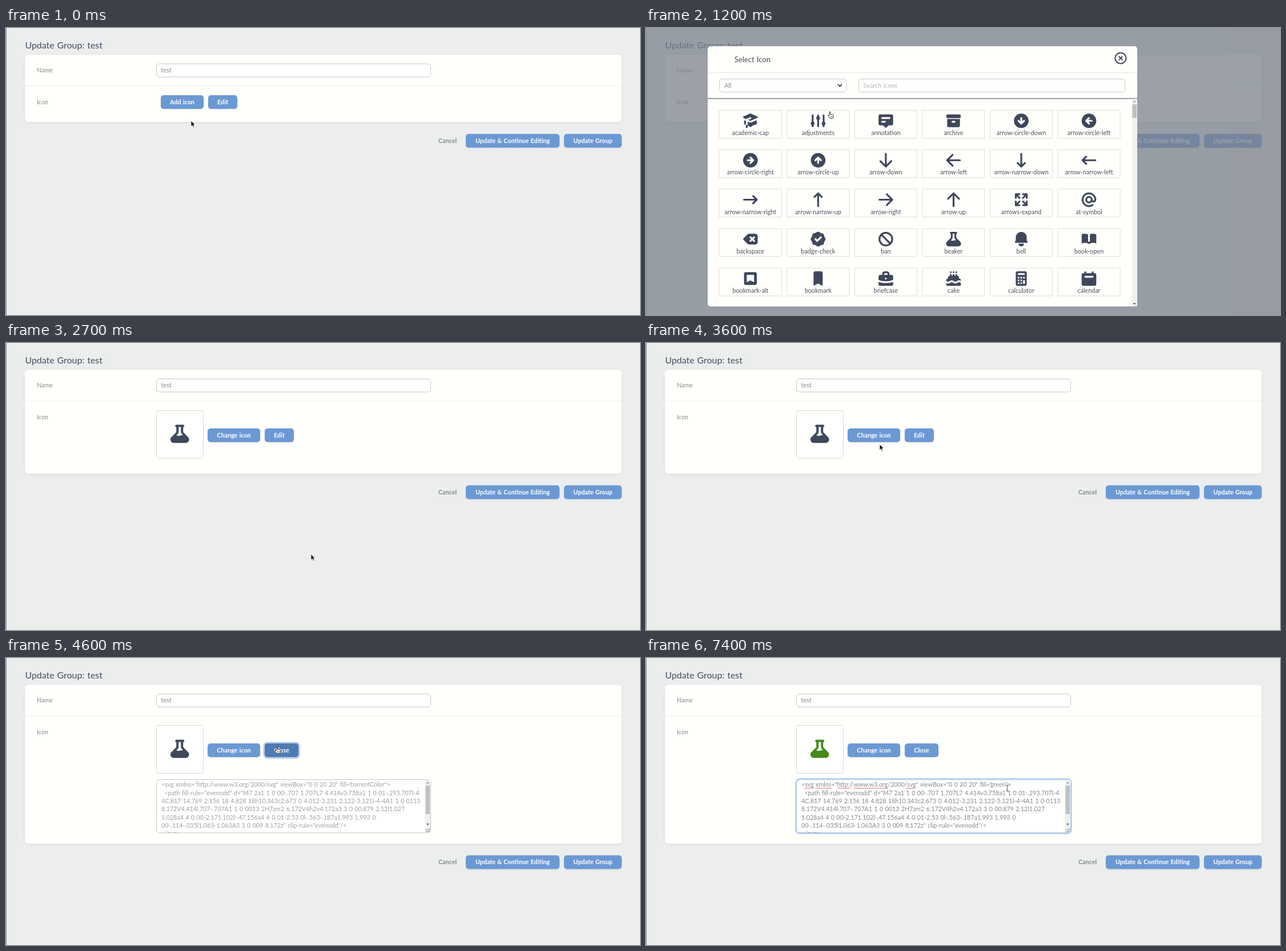
An HTML page that plays this animation: 1110x504 px, repeating every 8 s.

```html
<!DOCTYPE html>
<html lang="en">
<head>
<meta charset="utf-8">
<title>Icon field</title>
<style>
  html, body { margin: 0; width: 100%; height: 100%; overflow: hidden; background: #eceeee; }
  #stage { display: block; width: 100vw; height: 100vh; }
  text { font: 10.75px Lato, sans-serif; word-spacing: .06em; fill: #868a8f; }
  .title { font-size: 15.9px; fill: #454d5c; }
  .head { font-size: 13.1px; fill: #454d5c; }
  .bold { font-weight: 700; text-anchor: middle; }
  .btn { filter: drop-shadow(0 1px 1px rgba(0, 0, 0, .12)); }
  .btn rect { fill: #6b99d4; }
  .btn .hover { fill: #4f7bb4; }
  .btn .ring { fill: #b5cfee; }
  .btn text { fill: #fff; }
  .field { fill: #fffffe; stroke: #c4c9cc; }
  .focus { fill: none; stroke: #b5cdec; stroke-width: 3; }
  .hint { fill: #b3b6ba; }
  .cell rect { fill: none; stroke: #dde0dc; }
  .cell text { fill: #4a5160; text-anchor: middle; }
  .ink { fill: #3f475a; }
  .line { fill: none; stroke: #3f475a; stroke-width: 2; stroke-linecap: round; stroke-linejoin: round; }
  .cut { stroke: #fffffc; }
  .code text { font-size: 10.7px; }
  .panel { fill: #fffffc; }
  #card { filter: drop-shadow(0 1px 2px rgba(0, 0, 0, .07)); }

  #card, #actions, #pick, #typed, #cursor { animation: 8s step-end infinite; }
  #card { animation-name: grow; }
  #actions { animation-name: shift; }
  #pick { animation-name: tint; }
  #typed { animation-name: type; }
  #cursor { animation-name: move; }
  #code { animation: fade 8s step-end infinite; }

  @keyframes grow { 0% { height: 118px } 33.75% { height: 182.5px } 53.75%, 100% { height: 279px } }
  @keyframes shift {
    0% { transform: none }
    33.75% { transform: translateY(64px) }
    53.75%, 100% { transform: translateY(160.5px) }
  }
  @keyframes tint { 0% { fill: #3f475a } 85% { fill: #000 } 92.5%, 100% { fill: #458b1a } }
  @keyframes fade {
    0% { opacity: 0 }
    53.75% { opacity: .2; animation-timing-function: steps(4) }
    58.75%, 100% { opacity: 1 }
  }
  @keyframes type {
    0% { transform: none }
    85% { transform: translateY(-20px) }
    87.5% { transform: translateY(-40px) }
    88.75% { transform: translateY(-60px) }
    90% { transform: translateY(-80px) }
    92.5%, 100% { transform: translateY(-100px) }
  }
  @keyframes move {
    0% { transform: translate(324px, 163px) }
    2.5% { transform: translate(324px, 163px); animation-timing-function: steps(4) }
    7.5% { transform: translate(322px, 141px); animation-timing-function: steps(2) }
    10% { transform: translate(321px, 135px) }
    12.5% { transform: translate(320px, 134px) }
    15% { transform: translate(321px, 147px); animation-timing-function: steps(8) }
    25% { transform: translate(562px, 331px); animation-timing-function: steps(3) }
    28.75% { transform: translate(540px, 390px); animation-timing-function: steps(2) }
    31.25% { transform: translate(534px, 371px) }
    37.5% { transform: translate(534px, 372px); animation-timing-function: steps(6) }
    45% { transform: translate(409px, 178px) }
    46.25% { transform: translate(409px, 178px); animation-timing-function: steps(4) }
    51.25% { transform: translate(473px, 156px) }
    58.75% { transform: translate(455px, 180px) }
    60% { transform: translate(455px, 180px); animation-timing-function: steps(2) }
    62.5% { transform: translate(410px, 217px); animation-timing-function: steps(7) }
    71.25% { transform: translate(631.5px, 228.5px) }
    80%, 100% { transform: translate(632.5px, 228.5px) }
  }
</style>
</head>
<body>
<svg id="stage" viewBox="0 0 1110 504" preserveAspectRatio="none"></svg>
<script>
const LOOP = 8000;

// Windows in ms during which an element is visible.
const shown = {
  add: [[0, 2700]], addHover: [[600, 1200]], addRing: [[800, 1200]],
  modal: [[1200, 2700]],
  chosen: [[2700, LOOP]], changeHover: [[3800, 4000]],
  edit: [[2700, 4300]], editHover: [[4000, 4300]],
  close: [[4300, LOOP]], closeHover: [[4300, 4700]], closeRing: [[4300, 5800]],
  area: [[4300, LOOP]], areaFocus: [[5800, LOOP]],
  spell: [[5900, LOOP]], selection: [[5900, 6800]],
  arrow: [[0, 600], [2700, 3800], [4700, 5000]],
  hand: [[600, 2700], [3800, 4700]],
  beam: [[5000, LOOP]]
};

const windowCss = ([id, spans]) => {
  const key = (ms, o) => `${ms / LOOP * 100}% { opacity: ${o} }`;
  const keys = spans.map(([a, b]) => key(a, 1) + key(b, b < LOOP ? 0 : 1)).join('');
  return `@keyframes ${id} { 0% { opacity: 0 } ${keys} }
    #${id} { opacity: 0; animation: ${id} ${LOOP}ms step-end infinite }`;
};
const sheet = document.createElement('style');
sheet.textContent = Object.entries(shown).map(windowCss).join('\n');
document.head.append(sheet);

const esc = s => s.replace(/&/g, '&amp;').replace(/</g, '&lt;');
const text = (x, y, s, cls = '') => `<text x="${x}" y="${y}" class="${cls}">${esc(s)}</text>`;
const rect = (x, y, w, h, rx = 0, attrs = '') =>
  `<rect x="${x}" y="${y}" width="${w}" height="${h}" rx="${rx}" ${attrs}/>`;
const path = (d, attrs) => `<path d="${d}" ${attrs}/>`;

const button = (x, y, w, label, id = '') => `<g class="btn">
  ${id && rect(x - 2.5, y - 2.5, w + 5, 29, 7, `id="${id}Ring" class="ring" opacity="0"`)}
  ${rect(x, y, w, 24, 5)}
  ${id && rect(x, y, w, 24, 5, `id="${id}Hover" class="hover" opacity="0"`)}
  ${text(x + w / 2, y + 15.6, label, 'bold')}</g>`;

const beaker = 'M7 2a1 1 0 00-.707 1.707L7 4.414v3.758a1 1 0 01-.293.707l-4 4C.817 14.769 2.156 18 4.828 18h10.343c2.673 0 4.012-3.231 2.122-5.121l-4-4A1 1 0 0113 8.172V4.414l.707-.707A1 1 0 0013 2H7zm2 6.172V4h2v4.172a3 3 0 00.879 2.12l1.027 1.028a4 4 0 00-2.171.102l-.47.156a4 4 0 01-2.53 0l-.563-.187a1.993 1.993 0 00-.114-.035l1.063-1.063A3 3 0 009 8.172z';

// Icon parts on a 20 unit grid.
const fill = d => path(d, 'class="ink" fill-rule="evenodd"');
const line = d => path(d, 'class="line"');
const cut = d => path(d, 'class="line cut"');
const turn = (deg, s) => `<g transform="rotate(${deg} 10 10)">${s}</g>`;
const disc = '<circle cx="10" cy="10" r="8" class="ink"/>';
const ring = r => `<circle cx="10" cy="10" r="${r}" class="line"/>`;
const round = deg => turn(deg, disc + cut('M10 7v5.5M7 10l3 3 3-3'));
const wide = deg => turn(deg, line('M10 3v13M4 11l6 6 6-6'));
const narrow = deg => turn(deg, line('M10 3v13M6 13l4 4 4-4'));

const icons = {
  'academic-cap': fill('M10.4 2.08a1 1 0 00-.8 0l-7 3a1 1 0 000 1.84L5.25 8.05a1 1 0 01.36-.26l4-1.71a1 1 0 11.79 1.84L7.67 9.09l1.94.83a1 1 0 00.79 0l7-3a1 1 0 000-1.84z')
    + fill('M3.3 9.4L5 10.12v4.1a9 9 0 00-1.05-.17 1 1 0 01-.9-.9 11 11 0 01.25-3.75zM9.3 16.57A9 9 0 007 14.93v-3.95l1.82.78a3 3 0 002.36 0l5.5-2.36a11 11 0 01.26 3.76 1 1 0 01-.9.89 9 9 0 00-5.34 2.52 1 1 0 01-1.4 0zM6 18a1 1 0 001-1v-2.07a9 9 0 00-2-.7V17a1 1 0 001 1z'),
  'adjustments': line('M4 4v12M10 4v12M16 4v12')
    + [[4, 13], [10, 7], [16, 13]].map(([x, y]) => `<circle cx="${x}" cy="${y}" r="2" class="ink"/>`).join(''),
  'annotation': fill('M18 13V5a2 2 0 00-2-2H4a2 2 0 00-2 2v8a2 2 0 002 2h3l3 3 3-3h3a2 2 0 002-2z') + cut('M6 7h8M6 11h3'),
  'archive': fill('M4 3a2 2 0 100 4h12a2 2 0 100-4H4zM3 8h14v7a2 2 0 01-2 2H5a2 2 0 01-2-2z') + cut('M9 11h2'),
  'arrow-circle-down': round(0),
  'arrow-circle-left': round(90),
  'arrow-circle-right': round(270),
  'arrow-circle-up': round(180),
  'arrow-down': wide(0),
  'arrow-left': wide(90),
  'arrow-narrow-down': narrow(0),
  'arrow-narrow-left': narrow(90),
  'arrow-narrow-right': narrow(270),
  'arrow-narrow-up': narrow(180),
  'arrow-right': wide(270),
  'arrow-up': wide(180),
  'arrows-expand': [0, 90, 180, 270].map(a => turn(a, line('M8 4H4v4M4 4l4 4'))).join(''),
  'at-symbol': ring(3) + line('M13 10a2 2 0 004 0A7 7 0 1013.8 15.9'),
  'backspace': fill('M6.7 4.88A3 3 0 018.83 4H15a3 3 0 013 3v6a3 3 0 01-3 3H8.83a3 3 0 01-2.12-.88L2.3 10.7a1 1 0 010-1.4z') + cut('M10 8l4 4M14 8l-4 4'),
  'badge-check': [0, 90, 180, 270].map(a => turn(a,
    fill('M10 10L3.45 6.27a3.07 3.07 0 012.82-2.82 3.07 3.07 0 001.74-.72 3.07 3.07 0 013.98 0 3.07 3.07 0 001.74.72z'))).join('')
    + cut('M7 10l2 2 4-4'),
  'ban': ring(7) + line('M5.2 5.2l9.6 9.6'),
  'beaker': fill(beaker),
  'bell': fill('M10 2a6 6 0 00-6 6v3.59l-.7.7A1 1 0 004 14h12a1 1 0 00.7-1.7l-.7-.71V8a6 6 0 00-6-6zM10 18a3 3 0 01-3-3h6a3 3 0 01-3 3z'),
  'book-open': fill('M9 4.8A8 8 0 005.5 4c-1.25 0-2.44.3-3.5.8v10a8 8 0 013.5-.8c1.67 0 3.22.5 4.5 1.4a8 8 0 014.5-1.4c1.25 0 2.44.3 3.5.8v-10a8 8 0 00-3.5-.8c-1.25 0-2.44.3-3.5.8V12a1 1 0 11-2 0z'),
  'bookmark-alt': fill('M3 5a2 2 0 012-2h10a2 2 0 012 2v10a2 2 0 01-2 2H5a2 2 0 01-2-2zM14 6H6v8l4-2 4 2z'),
  'bookmark': fill('M5 4a2 2 0 012-2h6a2 2 0 012 2v14l-5-2.5L5 18z'),
  'briefcase': fill('M6 6V5a3 3 0 013-3h2a3 3 0 013 3v1h2a2 2 0 012 2v3.57A23 23 0 0110 13a23 23 0 01-8-1.43V8a2 2 0 012-2zM8 5a1 1 0 011-1h2a1 1 0 011 1v1H8z')
    + fill('M2 13.7V16a2 2 0 002 2h12a2 2 0 002-2v-2.3A25 25 0 0110 15a25 25 0 01-8-1.3z') + cut('M10 10h.01'),
  'cake': fill('M4 10V9a2 2 0 012-2h8a2 2 0 012 2v1a2 2 0 012 2v5a1 1 0 01-1 1H3a1 1 0 01-1-1v-5a2 2 0 012-2z')
    + line('M7 6v2M10 6v2M13 6v2M7 3h.01M10 3h.01M13 3h.01') + cut('M2 13.7q2 1.6 4 0t4 0 4 0 4 0'),
  'calculator': fill('M6 2h8a2 2 0 012 2v12a2 2 0 01-2 2H6a2 2 0 01-2-2V4a2 2 0 012-2z')
    + cut('M7 5h6M7 9h.01M10 9h.01M13 9h.01M7 12h.01M10 12h.01M7 15h.01M10 15h.01M13 12.5v2.5'),
  'calendar': fill('M4 4h12a2 2 0 012 2v10a2 2 0 01-2 2H4a2 2 0 01-2-2V6a2 2 0 012-2z') + line('M6 3v2M14 3v2') + cut('M6 8h8')
};

const cell = ([name, art], i) => {
  const x = 128.3 + i % 6 * 118.55, y = 144.5 + Math.floor(i / 6) * 69.25;
  return `<g class="cell" transform="translate(${x} ${y})">${rect(0, 0, 109, 49)}
    <g transform="translate(38.5 2.5) scale(1.6)">${art}</g>${text(54.5, 43.6, name)}</g>`;
};

const triangle = (x, y, s, color) =>
  path(`M${x - 2.5} ${y + 1.3 * s}h5l-2.5 ${-2.8 * s}z`, `fill="${color}"`);

const page = `
  ${rect(0, 0, 1110, 504, 0, 'fill="#eceeee"')}
  ${rect(0, 0, 1, 504, 0, 'fill="#7a849a"')}
  ${text(33.5, 35.5, 'Update Group: test', 'title')}
  ${rect(33, 47, 1045, 118, 6, 'id="card" class="panel"')}
  ${rect(33, 101.5, 1045, 1, 0, 'fill="#eef0f0"')}
  ${text(54, 78, 'Name')}${text(54, 133.5, 'Icon')}
  ${rect(263.5, 63, 480, 23, 5.5, 'class="field"')}
  ${text(271.5, 78, 'test')}
  <g id="actions">${text(773, 201.6, 'Cancel', 'bold')}
    ${button(805, 186, 164, 'Update & Continue Editing')}${button(977, 186, 101, 'Update Group')}</g>
  <g id="add">${button(271, 118, 75, 'Add icon', 'add')}${button(354, 118, 51, 'Edit')}</g>
  <g id="chosen">
    ${rect(263.5, 118.5, 82, 84, 4, 'class="field" style="stroke:#d3d6d8"')}
    <g transform="translate(284.2 139.5) scale(2)">${path(beaker, 'id="pick" fill-rule="evenodd"')}</g>
    ${button(353, 150, 92, 'Change icon', 'change')}
    <g id="edit">${button(453, 150, 51, 'Edit', 'edit')}</g>
    <g id="close">${button(453, 150, 59, 'Close', 'close')}</g>
  </g>`;

const lines = [
  '<path fill-rule="evenodd" d="M7 2a1 1 0 00-.707 1.707L7 4.414v3.758a1 1 0 01-.293.707l-4',
  '4C.817 14.769 2.156 18 4.828 18h10.343c2.673 0 4.012-3.231 2.122-5.121l-4-4A1 1 0 0113',
  '8.172V4.414l.707-.707A1 1 0 0013 2H7zm2 6.172V4h2v4.172a3 3 0 00.879 2.12l1.027',
  '1.028a4 4 0 00-2.171.102l-.47.156a4 4 0 01-2.53 0l-.563-.187a1.993 1.993 0',
  '00-.114-.035l1.063-1.063A3 3 0 009 8.172z" clip-rule="evenodd"/>',
  '</svg>'
];
const values = ['currentColor', 'g', 'gr', 'gre', 'gree', 'green'];

const area = `<g id="area">
  ${rect(263.5, 213.5, 480, 93.5, 5, 'class="field"')}
  ${rect(262.8, 212.8, 481.4, 95, 6, 'id="areaFocus" class="focus"')}
  ${rect(603, 216.5, 59, 13, 0, 'id="selection" fill="#b6d3f7"')}
  <svg x="264" y="214" width="470" height="92.5" viewBox="264 214 470 92.5"><g id="code" class="code">
    ${text(272, 226.3, '<svg xmlns="http://www.w3.org/2000/svg" viewBox="0 0 20 20" fill="')}
    <svg x="603" y="214" width="90" height="16"><g id="typed">
      ${values.map((v, i) => text(0, 12.3 + 20 * i, v + '">')).join('')}</g></svg>
    ${lines.map((s, i) => text(i ? 272 : 277.3, 226.3 + 14.35 * (i + 1), s)).join('')}
  </g></svg>
  ${path('M278 228.7h16M297 228.7h28M336 228.7h22M364 228.7h60M455 228.7h16',
    'id="spell" stroke="#e0484c" stroke-width="1.2" stroke-dasharray="1.6 .9"')}
  ${rect(733.5, 214.5, 9.5, 84, 0, 'fill="#f1f1f0"')}
  ${rect(734.5, 224, 7.5, 50, 0, 'fill="#c1c1c1"')}
  ${triangle(738.3, 219, 1, '#8e8e8e')}${triangle(738.3, 292, -1, '#505050')}
  ${rect(733.5, 299, 9.5, 7, 0, 'fill="#dcdcdc"')}
  ${path('M736 306l6-6M739.5 306l2.5-2.5', 'stroke="#777" stroke-width=".8"')}
</g>`;

const modal = `<g id="modal">
  ${rect(0, 0, 1110, 504, 0, 'fill="rgba(120,126,138,.73)"')}
  ${rect(108, 32, 752, 457, 5, 'class="panel"')}
  ${text(154.7, 59.6, 'Select Icon', 'head')}
  <circle cx="831" cy="53" r="9.6" class="line"/>
  ${path('M828.5 50.5l5 5M833.5 50.5l-5 5', 'class="line" style="stroke-width:2.4"')}
  ${rect(108, 78, 752, 1, 0, 'fill="#e6e9ea"')}
  ${rect(128.5, 89.5, 222.5, 23, 5, 'class="field"')}${text(137, 104.7, 'All')}
  ${path('M336.5 99.5l3 3 3-3', 'class="line" style="stroke:#222;stroke-width:1.7"')}
  ${rect(372.5, 89.5, 466, 23, 5, 'class="field"')}${text(380.5, 104.7, 'Search icons', 'hint')}
  ${rect(108, 123.3, 752, 1.2, 0, 'fill="#596070"')}
  ${Object.entries(icons).map(cell).join('')}
  ${rect(850.5, 124.5, 9.5, 364, 0, 'fill="#f1f1f0"')}
  ${rect(851.5, 134, 7.5, 24, 0, 'fill="#c1c1c1"')}
  ${triangle(855.2, 129, 1, '#8e8e8e')}${triangle(855.2, 484.3, -1, '#505050')}
</g>`;

const cursor = `<g id="cursor">
  ${path('M0 0v10l2.3-2.2 1.6 3.7 1.8-.8-1.6-3.6h3z', 'id="arrow" fill="#111" stroke="#fff" stroke-width=".7"')}
  <g id="hand" stroke="#222" stroke-width=".9" stroke-linejoin="round">
    ${path('M0 .8c0-1.2 1.8-1.2 1.8 0v3.4l4.2.8c1.2.3 1.6 1 1.4 2.2l-.6 3c0 .8-.5 1.3-1.3 1.3H1.6c-.8 0-1.2-.4-1.6-1.1L-2.4 7c-.4-.9.6-1.6 1.4-.9L0 7z', 'fill="#fff"')}
    ${path('M2.2 7.6v2.2M3.8 7.6v2.2M5.4 7.6v2.2', 'stroke-width=".6"')}</g>
  ${path('M-2.2-5.5q2.2 0 2.2 1.3 0-1.3 2.2-1.3M0-4.5v9M-2.2 5.5q2.2 0 2.2-1.3 0 1.3 2.2 1.3',
    'id="beam" fill="none" stroke="#333" stroke-width="1"')}
</g>`;

document.getElementById('stage').innerHTML = page + area + modal + cursor;
</script>
</body>
</html>
```
